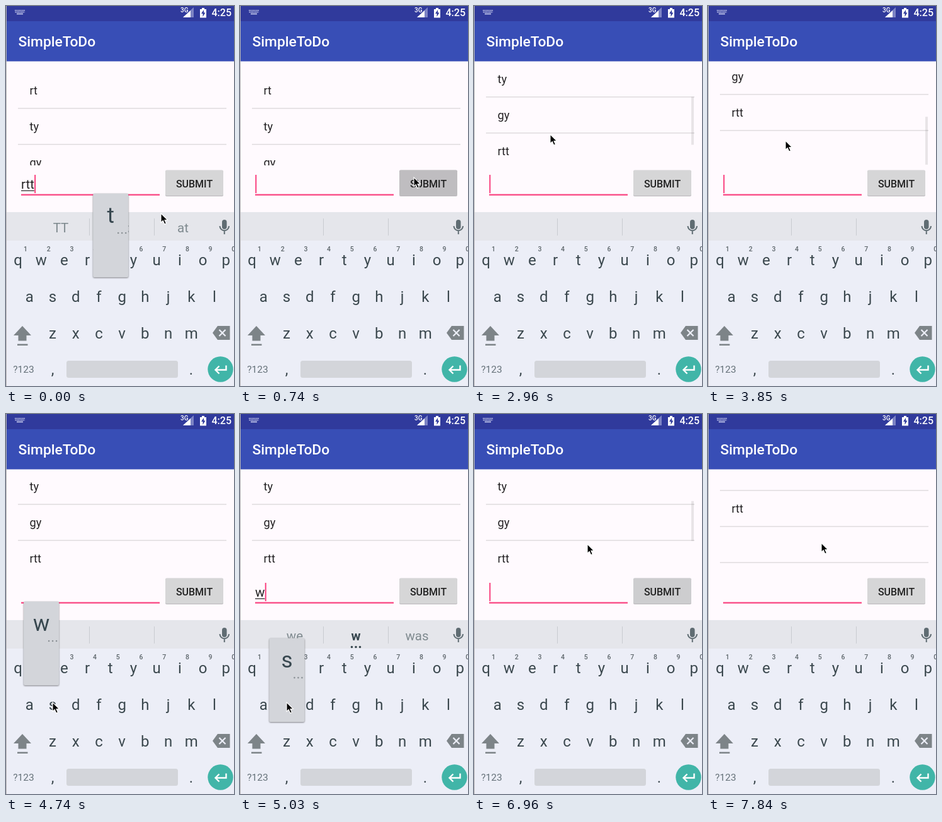
These frames come from a looping animation (362x601 px, 7990 ms). An HTML page:

```html
<!DOCTYPE html>
<html lang="en">
<head>
<meta charset="utf-8">
<title>To-do list</title>
<style>
  html, body { margin: 0; width: 100%; height: 100%; overflow: hidden; background: #fffafe; }
  svg { display: block; width: 362px; height: 601px; font-family: Roboto, sans-serif; }
  .mid { text-anchor: middle; }
  .med { font-weight: 500; }
  .dots { fill: none; stroke-linecap: round; }
  #keys { font-size: 24px; fill: #3b484e; }
  #digits { font-size: 10.5px; font-weight: 500; fill: #5d666b; }
  #rows { font-size: 18.2px; fill: #242224; }
  #words { font-size: 20.5px; fill: #7f8a8f; }
  #words .bold { font-weight: 700; fill: #37474f; }
  #popup rect { filter: drop-shadow(0 1.5px 1px #0007); }
</style>
</head>
<body>
<svg viewBox="0 0 362 601">
  <defs>
    <clipPath id="listArea"><rect y="104" width="362" height="148"/></clipPath>
    <rect id="button" x="253" y="259.5" width="92" height="40.5" rx="2"/>
  </defs>
  <rect width="362" height="601" fill="#fffafe"/>

  <!-- status bar and title -->
  <rect width="362" height="24" fill="#303a9c"/>
  <rect y="24" width="362" height="63.5" fill="#384eb6"/>
  <g stroke="#c6caec" stroke-width="1.7">
    <path d="M14 7h16M14.5 9.7h15" stroke-dasharray="1.7 .7"/>
    <path d="M17 12.5h10"/>
  </g>
  <text class="med" x="277" y="9.5" font-size="10" fill="#fff">3G</text>
  <path d="M281 18L298 2V18Z" fill="#7c83c4"/>
  <path d="M281 18L293 7V18Z" fill="#fff"/>
  <path d="M308 5h3v-2h4v2h3v13.500h-10Z" fill="#fff"/>
  <path d="M314 6l-4 6h2.500v5l4-6.500h-2.500Z" fill="#303a9c"/>
  <text class="med" x="326.5" y="16" font-size="16" fill="#fff">4:25</text>
  <text class="med" x="19.5" y="64" font-size="22.8" fill="#fff">SimpleToDo</text>

  <g clip-path="url(#listArea)">
    <g id="rows"></g>
    <rect id="bar" x="345" width="4" fill="#000" fill-opacity=".09"/>
  </g>

  <!-- entry field and button -->
  <rect x="24" y="297.5" width="220" height="2.2" fill="#f9407f"/>
  <text id="entry" x="24" y="289" font-size="20.5" fill="#222"></text>
  <rect id="entryLine" x="24" y="291.5" height="1.2" fill="#222"/>
  <rect id="caret" y="267" width="2" height="29" fill="#f9407f"/>
  <use href="#button" y="1" fill="#b9b7ba"/>
  <use href="#button" fill="#d6d6d7"/>
  <use href="#button" id="press" fill="#bfbdc0"/>
  <text class="mid med" x="299" y="286.5" font-size="16" fill="#222">SUBMIT</text>

  <!-- keyboard -->
  <rect y="326" width="362" height="275" fill="#eceef7"/>
  <rect y="326" width="362" height="45" fill="#e5e6eb"/>
  <path d="M132.5 336v27M235.5 336v27" stroke="#c8cbd0"/>
  <g id="words"></g>
  <path id="more" class="dots" d="M177.5 368.5h13.5" stroke="#37474f" stroke-width="3.6" stroke-dasharray="0 6.5"/>
  <rect x="343" y="338" width="7.5" height="15" rx="3.75" fill="#5f6c72"/>
  <path d="M339.5 348a7.25 7.25 0 0 0 14.5 0M346.75 355v6" fill="none" stroke="#5f6c72" stroke-width="2"/>
  <g id="digits"></g>
  <g id="keys"></g>
  <path d="M26 506L40 521H32.5V529.5H19.5V521H12Z" fill="#7d8488"/>
  <rect x="18" y="534.5" width="16.5" height="2.5" fill="#7d8488"/>
  <path d="M336 506H355.5V528H336L328 517Z" fill="#7d8488"/>
  <path d="M338.5 512l10 10m0-10l-10 10" stroke="#eceef7" stroke-width="2.2"/>
  <text class="mid" x="28" y="580" font-size="15.5" fill="#66727a">?123</text>
  <rect x="96" y="561" width="177" height="27" rx="3.5" fill="#d3d5da"/>
  <circle cx="340.5" cy="574.5" r="20.2" fill="#41b5a8"/>
  <path d="M349.5 568.5v7h-17m6-6l-6 6l6 6" fill="none" stroke="#fff" stroke-width="2.4"/>

  <g id="popup">
    <rect x="-28" y="296.5" width="56" height="132.5" rx="2" fill="#d3d5da"/>
    <text id="popLetter" class="mid" y="343" font-size="35" fill="#37474f"></text>
    <path class="dots" d="M12 359h12.5" stroke="#8b9196" stroke-width="2.6" stroke-dasharray="0 6"/>
  </g>

  <path d="M.5 0V601" stroke="#b8b6b8"/>
  <path id="pointer" d="M0 0V14.5L3.3 11.5L5.7 17L8.3 15.9L6 10.5H10.5Z" stroke="#fff" stroke-width="1.1"/>
</svg>
<script>
const LOOP = 7990, FRAMES = 54, STEP = LOOP / FRAMES;
const ROW = 57, LIST_TOP = 105, LIST_HEIGHT = 147, KEY_WIDTH = 36.7, KEY_HEIGHT = 58.1;
const TRAVEL = 400, FLICK = 500, SWING = 35;

const $ = id => document.getElementById(id);
const set = (id, key, value) => $(id).setAttribute(key, value);
const clamp = u => Math.min(1, Math.max(0, u));
const smooth = u => (u = clamp(u), u * u * (3 - 2 * u));
const sum = (list, f) => list.reduce((total, item) => total + f(...item), 0);

function add(parent, tag, attrs, text = '') {
  const el = document.createElementNS('http://www.w3.org/2000/svg', tag);
  for (const key in attrs) el.setAttribute(key, attrs[key]);
  el.textContent = text;
  return $(parent).appendChild(el);
}

// Each row of keys starts a half or a whole key further in.
const keyAt = {};
['qwertyuiop', 'asdfghjkl', 'zxcvbnm'].forEach((letters, row) =>
  [...letters].forEach((letter, i) => {
    const x = 19 + (i + [0, 0.5, 1.5][row]) * KEY_WIDTH;
    keyAt[letter] = { x, row };
    add('keys', 'text', { x, y: 410 + row * KEY_HEIGHT, class: 'mid' }, letter);
    if (!row) add('digits', 'text', { x: x + 12, y: 388, class: 'mid' }, (i + 1) % 10);
  }));
[[',', 74], ['.', 294]].forEach(([sign, x]) => add('keys', 'text', { x, y: 583, class: 'mid' }, sign));

const words = [87, 184, 281].map((x, i) =>
  add('words', 'text', { x, y: 357.5, class: i === 1 ? 'mid bold' : 'mid' }));

const rows = ['rt', 'ty', 'gy', 'rtt', '', 'ws'].map((label, i) => [
  add('rows', 'text', { x: 37.5, y: 140 + i * ROW }, label),
  add('rows', 'rect', { x: 19, y: 161.3 + i * ROW, width: 331, height: 1.2, fill: '#d8d5d8' })
]);

// Field contents; every clearing submits one item.
const edits = [[0, 'rtt'], [580, ''], [745, ''], [4870, 'w'], [5320, 'ws'], [5900, '']];
const suggestions = { rtt: ['TT', 'rtt', 'at'], w: ['we', 'w', 'was'], ws: ['as', 'WS', 'we'], '': ['', '', ''] };
const presses = [590, 5940];

// Pointer stops [arrival, x, y] and list flicks [start, distance].
const stops = [[0, 246, 328], [590, 276, 271], [1400, 317, 405], [2000, 121, 203], [3700, 123, 213],
  [4330, 57, 402], [4730, 74, 456], [5900, 280, 281], [6700, 180, 204]];
const flicks = [[2350, 75], [3200, 61], [3860, -60], [6950, 79]];

const editAt = t => edits.findLast(([time]) => time <= Math.max(0, t));

function pointerAt(t) {
  let [, px, py] = stops[0];
  for (const [arrival, x, y] of stops) {
    const u = smooth((t - arrival) / TRAVEL + 1);
    px += (x - px) * u;
    py += (y - py) * u;
  }
  const swing = sum(flicks, (start, dist) =>
    Math.sign(dist) * SWING * Math.sin(2 * Math.PI * clamp((t - start) / FLICK)));
  return [px, py + swing];
}

function drawField(t) {
  const [edited, text] = editAt(t);
  $('entry').textContent = text;
  const width = text ? $('entry').getComputedTextLength() : 0;
  set('entryLine', 'width', width);
  set('caret', 'x', 24.3 + width);
  set('caret', 'opacity', (t - edited) % 1000 < 500 ? 1 : 0);
  set('press', 'opacity', Math.max(...presses.map(p => t < p ? 0 : clamp((p + 1400 - t) / 1000))));
}

function drawKeyboard(t) {
  const shown = suggestions[editAt(t - 140)[1]];
  words.forEach((word, i) => word.textContent = shown[i]);
  set('more', 'opacity', shown[1] ? 1 : 0);

  // A key pops up shortly before its letter arrives.
  const typing = edits.find(([time, text]) => text && t > time - 440 && t < time + 10);
  set('popup', 'visibility', typing ? 'visible' : 'hidden');
  if (typing) {
    const letter = typing[1].at(-1), { x, row } = keyAt[letter];
    $('popLetter').textContent = letter;
    set('popup', 'transform', `translate(${x + 0.4} ${row * KEY_HEIGHT})`);
  }
}

function drawList(t) {
  const count = 3 + edits.filter(([time, text]) => !text && time <= t).length;
  const total = count * ROW;
  const y = Math.round(sum(flicks, (start, dist) => dist * smooth((t - start) / FLICK)));
  rows.forEach(([label, line], i) => {
    label.setAttribute('opacity', i < count ? 1 : 0);
    line.setAttribute('opacity', i < count - 1 ? 1 : 0);
  });
  set('rows', 'transform', `translate(0 ${-y})`);
  set('bar', 'y', LIST_TOP + y / total * LIST_HEIGHT);
  set('bar', 'height', LIST_HEIGHT ** 2 / total);
  set('bar', 'opacity', Math.max(...flicks.map(([start]) =>
    t < start ? 0 : clamp((start + FLICK + 350 - t) / 200))));
}

function draw(t) {
  drawField(t);
  drawKeyboard(t);
  drawList(t);
  set('pointer', 'transform', `translate(${pointerAt(t).join(' ')})`);
}

// The picture advances in even steps.
function tick() {
  const t = performance.now() % LOOP;
  draw(Math.floor((t + 5) / STEP) % FRAMES * STEP);
  requestAnimationFrame(tick);
}
tick();
</script>
</body>
</html>
```
